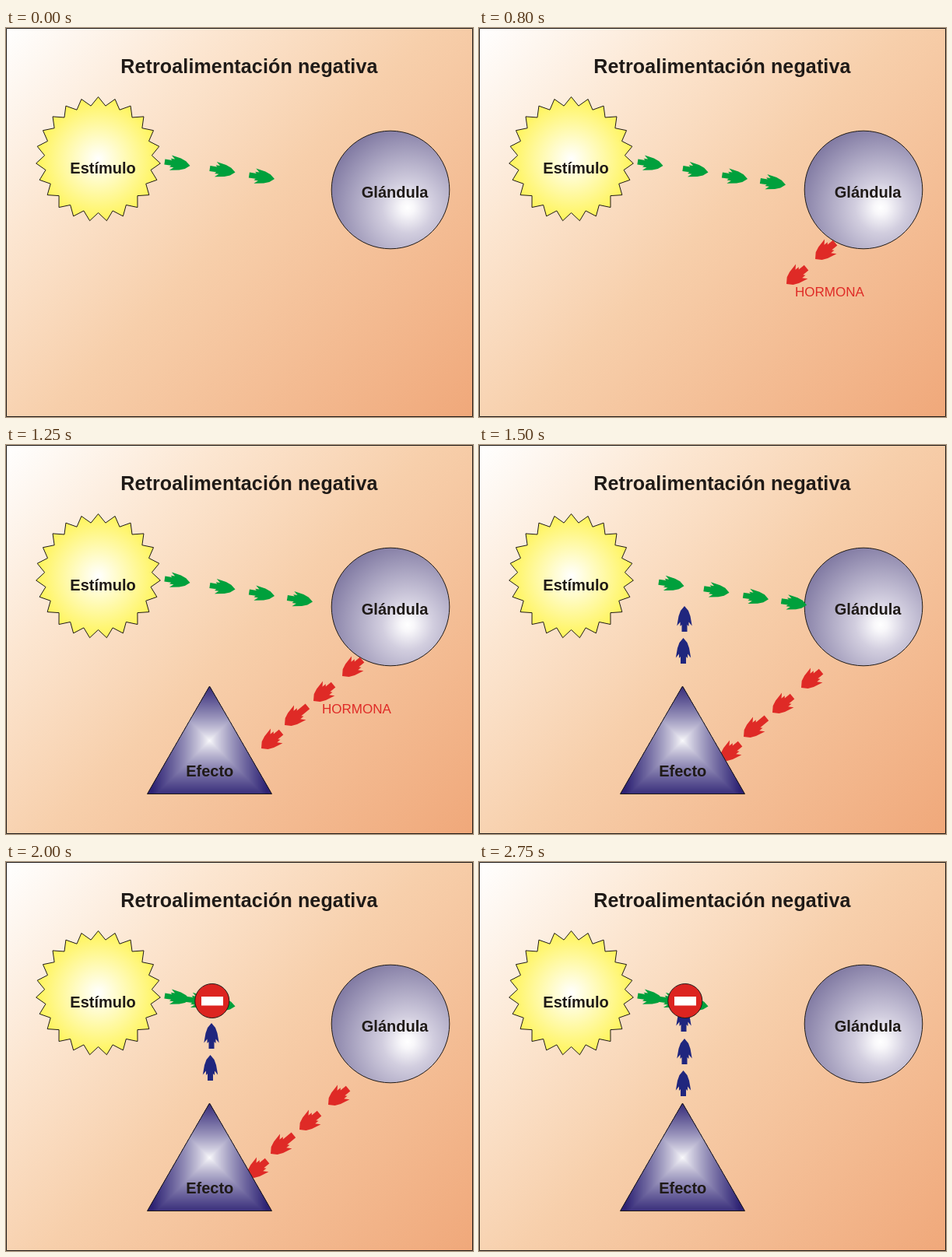
An HTML page with a canvas that plays this animation: 600 by 500 pixels, repeating every 3.15 s.

```html
<!DOCTYPE html>
<html lang="es">
<head>
<meta charset="utf-8">
<title>Retroalimentación negativa</title>
<style>
html, body { margin: 0; width: 100%; height: 100%; overflow: hidden; }
canvas { display: block; }
</style>
</head>
<body>
<canvas id="stage" width="600" height="500"></canvas>
<script>
const ctx = document.getElementById('stage').getContext('2d');
const LOOP = 3150;
const INK = '#1f1a17', GREEN = '#00a03c', RED = '#df2a26', BLUE = '#20267e';

// Each flow alternates between its resting place and a shifted one.
// Tips are [x, y, extra tail length].
const green = { color: GREEN, angle: 0.152, shift: [27, 4.2], width: 1,
  tips: [[236.5, 177], [294.5, 185.5], [345, 194], [394, 201.5]] };
const red = { color: RED, angle: 2.456, shift: [-18, 15], width: 1.25,
  tips: [[432, 297], [395, 329], [358, 360, 5], [328, 390]] };
const blue = { color: BLUE, angle: -Math.PI / 2, shift: [0, -20], width: 1,
  tips: [[262.5, 268], [264, 227], [263, 185]] };

const HALF_ARROW = [[-6, 5], [-13, 7.5], [-25.5, 9.7], [-20.5, 5.5], [-26, 5.5], [-24, 3.5]];

function outline() {
  ctx.strokeStyle = INK;
  ctx.lineWidth = 1;
  ctx.stroke();
}

function fillStops(gradient, stops) {
  for (const [at, color] of stops) gradient.addColorStop(at, color);
  ctx.fillStyle = gradient;
}

function polygon(points) {
  ctx.beginPath();
  for (const [x, y] of points) ctx.lineTo(x, y);
  ctx.closePath();
}

function label(text, x, y, size, { color = INK, weight = 'bold', spacing = 0 } = {}) {
  ctx.font = `${weight} ${size}px "Liberation Sans", Arial, sans-serif`;
  ctx.letterSpacing = spacing + 'px';
  ctx.fillStyle = color;
  ctx.fillText(text, x, y);
}

function arrow(x, y, { angle, color, width }, extra = 0) {
  const side = [...HALF_ARROW, [-33 - extra, 3.5]];
  const mirror = side.map(([px, py]) => [px, -py]).reverse();
  ctx.save();
  ctx.translate(x, y);
  ctx.rotate(angle);
  ctx.scale(1, width);
  polygon([[0, 0], ...side, ...mirror]);
  ctx.fillStyle = color;
  ctx.fill();
  ctx.restore();
}

function flow(path, shifted, from, to) {
  const [dx, dy] = shifted ? path.shift : [0, 0];
  for (const [x, y, extra] of path.tips.slice(from, to)) arrow(x + dx, y + dy, path, extra);
}

function background() {
  fillStops(ctx.createLinearGradient(25, -25, 575, 525),
    [[0, '#ffffff'], [0.25, '#fce6d1'], [0.5, '#f7cfab'], [1, '#f0a87a']]);
  ctx.fillRect(0, 0, 600, 500);
  ctx.beginPath();
  ctx.rect(0.5, 0.5, 599, 499);
  outline();
  label('Retroalimentación negativa', 147.2, 58, 25, { spacing: 0.15 });
}

function stimulus() {
  const cx = 118.5, cy = 168.5, spikes = 23;
  const points = Array.from({ length: spikes * 2 }, (_, i) => {
    const a = i * Math.PI / spikes, r = i % 2 ? 69 : 80;
    return [cx + r * Math.sin(a), cy - r * Math.cos(a)];
  });
  polygon(points);
  fillStops(ctx.createRadialGradient(cx, cy, 0, cx, cy, 80),
    [[0, '#ffffff'], [1, '#fff458']]);
  ctx.fill();
  outline();
  label('Estímulo', 82.3, 187, 20);
}

function gland() {
  ctx.beginPath();
  ctx.arc(494, 208, 75.8, 0, Math.PI * 2);
  fillStops(ctx.createRadialGradient(516, 231, 0, 516, 231, 108),
    [[0, '#ffffff'], [0.08, '#f8f7fa'], [0.3, '#d2cedf'], [1, '#8079a2']]);
  ctx.fill();
  outline();
  label('Glándula', 456.8, 218, 20);
}

function effect() {
  const corners = [[261.5, 310], [341.5, 448.5], [181.5, 448.5]];
  const dark = [46, 35, 116];
  ctx.save();
  polygon(corners);
  ctx.clip();
  for (let d = 81; d > 0; d--) {
    const k = Math.min(1, d / 74) ** 0.8;
    ctx.fillStyle = `rgb(${dark.map(c => Math.round(255 + (c - 255) * k))})`;
    ctx.fillRect(261.5 - d, 380 - d, d * 2, d * 2);
  }
  ctx.restore();
  polygon(corners);
  outline();
  label('Efecto', 231.2, 426, 20);
}

function stopSign() {
  ctx.beginPath();
  ctx.arc(264.8, 178.5, 22, 0, Math.PI * 2);
  ctx.fillStyle = '#dc2420';
  ctx.fill();
  outline();
  ctx.fillStyle = '#fff';
  ctx.fillRect(251, 173, 28, 11.5);
}

function stepAt(t) {
  return t < 1000 ? Math.floor(t / 200) : Math.min(12, 5 + Math.floor((t - 1000) / 250));
}

function draw(step) {
  const shifted = step % 2 === 1;
  const blocked = step >= 9;

  background();
  stimulus();
  gland();

  if (blocked) {
    flow(green, false, 0, 2);
    flow(green, true, 0, 1);
  } else {
    flow(green, shifted, 0, step === 0 ? 3 : 4);
  }

  if (step >= 4 && step < 12) {
    flow(red, shifted, step >= 10 ? 1 : 0, step === 4 ? 2 : 4);
    if (!shifted) label('HORMONA', 406, 345, 17, { color: RED, weight: 'normal' });
  }

  if (step >= 6) effect();
  if (step >= 7) flow(blue, shifted, 0, shifted ? 2 : 3);
  if (blocked) stopSign();
}

function tick() {
  draw(stepAt(performance.now() % LOOP));
  requestAnimationFrame(tick);
}
tick();
</script>
</body>
</html>
```
